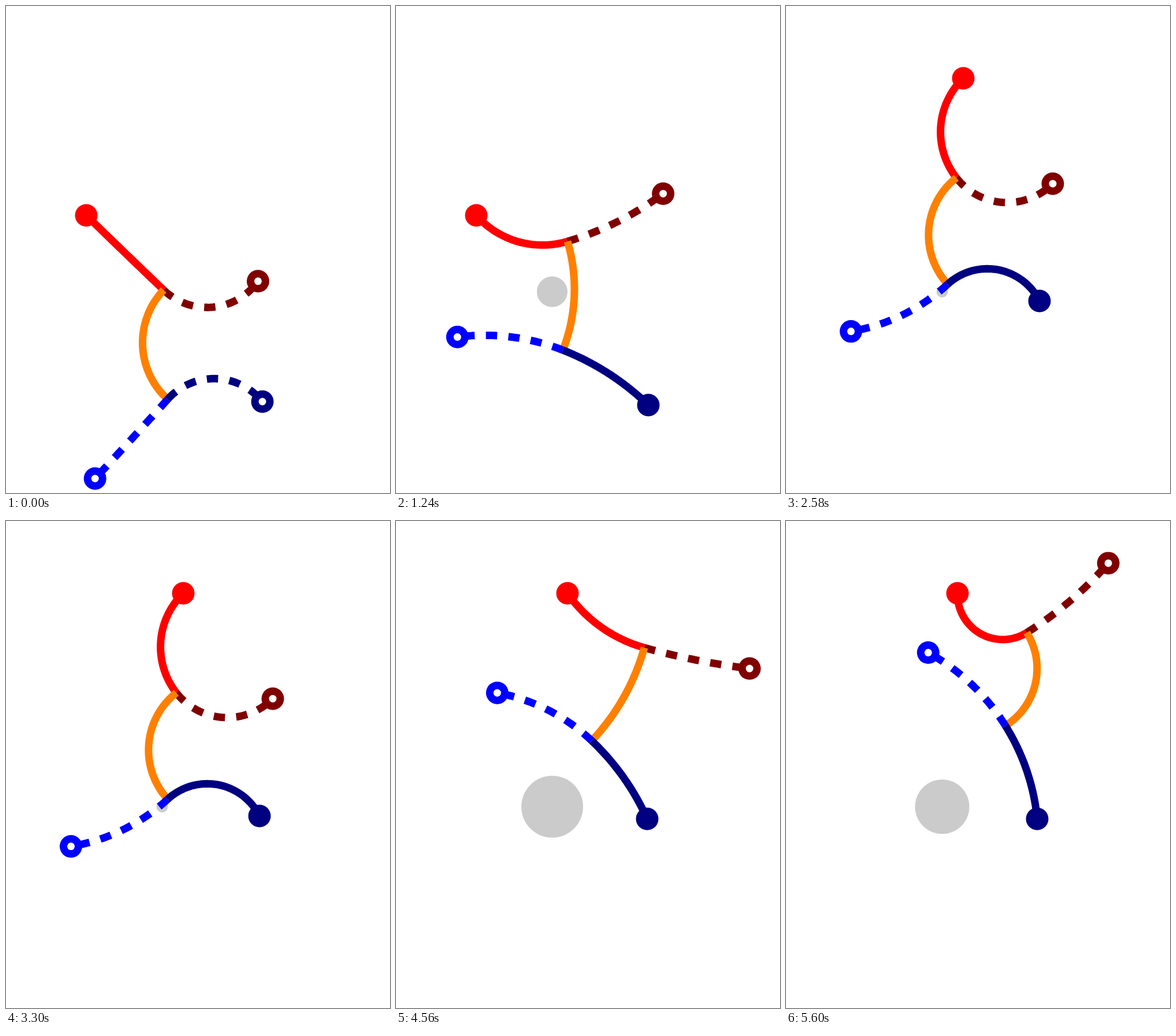
An HTML page with a canvas for the animation above (5.62 s loop, 665 by 842 pixels).

```html
<!DOCTYPE html>
<html lang="en">
<head>
<meta charset="utf-8">
<title>Walking soft robot</title>
<style>
  html, body { margin: 0; width: 100%; height: 100%; overflow: hidden; background: #fff; }
  canvas { display: block; }
</style>
</head>
<body>
<canvas id="stage" width="665" height="842"></canvas>
<script>
const ctx = document.getElementById('stage').getContext('2d');
const LOOP = 5620, STEP = 20, SWING = 540;
const WIDTH = 13, DASH = 1.5 * WIDTH, REACH = 186;
const rad = degrees => degrees * Math.PI / 180;

// Key poses: time, front joint, rear joint, front axis,
// bend of the free front leg, bend of the free rear leg, disc radius
const poses = [
  [0, 273, 491, 280, 680, 43.7, 49, 0.5, 0],
  [540, 297, 407, 289, 595, -16.5, 10, -14.3, 26.5],
  [1820, 273, 285, 222, 469, 45.6, 38.3, 3.3, 22],
  [2400, 295, 297, 280, 481, 51.9, 48.4, 16.6, 10],
  [4040, 402, 260, 387, 466, 8.6, 47.6, 15.8, 47],
  [4560, 430, 219, 339, 380, 15.6, 4.4, -16.5, 53.5],
  [5300, 417, 193, 380, 354, -32, 8.4, -14.5, 47]
];

// Footholds of the gripping legs: time of touchdown, x, y
const frontHolds = [[0, 139, 362], [1820, 260, 96.5], [2400, 307, 125], [4040, 297, 125]];
const rearHolds = [
  [0, 444, 684], [540, 437, 690], [1820, 379, 514],
  [2400, 439, 510], [4040, 484, 595], [4560, 435, 515]
];

// Each key is held until one swing before the next, then eased into it
function follow(keys, t) {
  const i = keys.findIndex(key => key[0] > t);
  if (i < 0) return { value: keys[keys.length - 1].slice(1), moving: false };
  const a = keys[i - 1], b = keys[i];
  const span = Math.min(SWING, b[0] - a[0]);
  const u = 1 - (b[0] - t) / span;
  const s = u < 0 ? 0 : (1 - Math.cos(Math.PI * u)) / 2;
  return { value: a.slice(1).map((p, k) => p + (b[k + 1] - p) * s), moving: u >= 0 };
}

// Half of the turn made by an arc leaving p at the given heading and ending in q
function halfTurn(p, heading, q) {
  const turn = Math.atan2(q[1] - p[1], q[0] - p[0]) - heading;
  return Math.atan2(Math.sin(turn), Math.cos(turn));
}

const sinc = x => Math.abs(x) < 1e-4 ? 1 : Math.sin(x) / x;

function arcLength(p, heading, q) {
  return Math.hypot(q[0] - p[0], q[1] - p[1]) / sinc(halfTurn(p, heading, q));
}

// End of an arc of the given length that turns by twice the bend
function arcEnd(p, heading, length, bend) {
  const chord = length * sinc(bend), a = heading + bend;
  return [p[0] + chord * Math.cos(a), p[1] + chord * Math.sin(a)];
}

function arc(p, heading, q, color, dashed) {
  const bend = halfTurn(p, heading, q), length = arcLength(p, heading, q);
  ctx.beginPath();
  for (let s = 0; s <= 40; s++) ctx.lineTo(...arcEnd(p, heading, length * s / 40, bend * s / 40));
  ctx.setLineDash(dashed ? [DASH, DASH] : []);
  ctx.lineWidth = WIDTH;
  ctx.strokeStyle = color;
  ctx.stroke();
}

function disc(p, radius, color) {
  ctx.beginPath();
  ctx.arc(p[0], p[1], radius, 0, 2 * Math.PI);
  ctx.fillStyle = color;
  ctx.fill();
}

function leg(joint, heading, foot, color, grip) {
  arc(joint, heading, foot, color, !grip);
  disc(foot, 1.5 * WIDTH, color);
  if (!grip) disc(foot, WIDTH / 2, '#fff');
}

function draw(t) {
  const [fx, fy, rx, ry, tilt, frontBend, rearBend, radius] = follow(poses, t).value;
  const front = [fx, fy], rear = [rx, ry];
  const axis = rad(tilt), spine = axis + Math.PI / 2, back = axis + Math.PI;
  const rearAxis = axis + 2 * halfTurn(front, spine, rear);
  const rearBack = rearAxis + Math.PI;

  // Free legs stretch along with the front gripping leg
  const frontHold = follow(frontHolds, t), rearHold = follow(rearHolds, t);
  const pull = arcLength(front, back, frontHold.value);
  const reach = Math.min(205, Math.max(REACH, pull));
  const frontFree = arcEnd(front, axis, reach, rad(-frontBend));
  const rearFree = arcEnd(rear, rearBack, reach, rad(rearBend));
  const swap = frontHold.moving;

  ctx.fillStyle = '#fff';
  ctx.fillRect(0, 0, 665, 842);
  disc([270.5, 494], radius, '#cbcbcb');
  leg(front, back, frontHold.value, '#f00', !swap);
  leg(front, axis, frontFree, '#800000', swap);
  arc(front, spine, rear, '#ff8000', false);
  leg(rear, rearBack, rearFree, '#00f', swap);
  leg(rear, rearAxis, rearHold.value, '#000080', !rearHold.moving);
}

const start = performance.now();
function tick() {
  const t = (performance.now() - start) % LOOP;
  draw(Math.floor(t / STEP) * STEP);
  requestAnimationFrame(tick);
}
tick();
</script>
</body>
</html>
```
